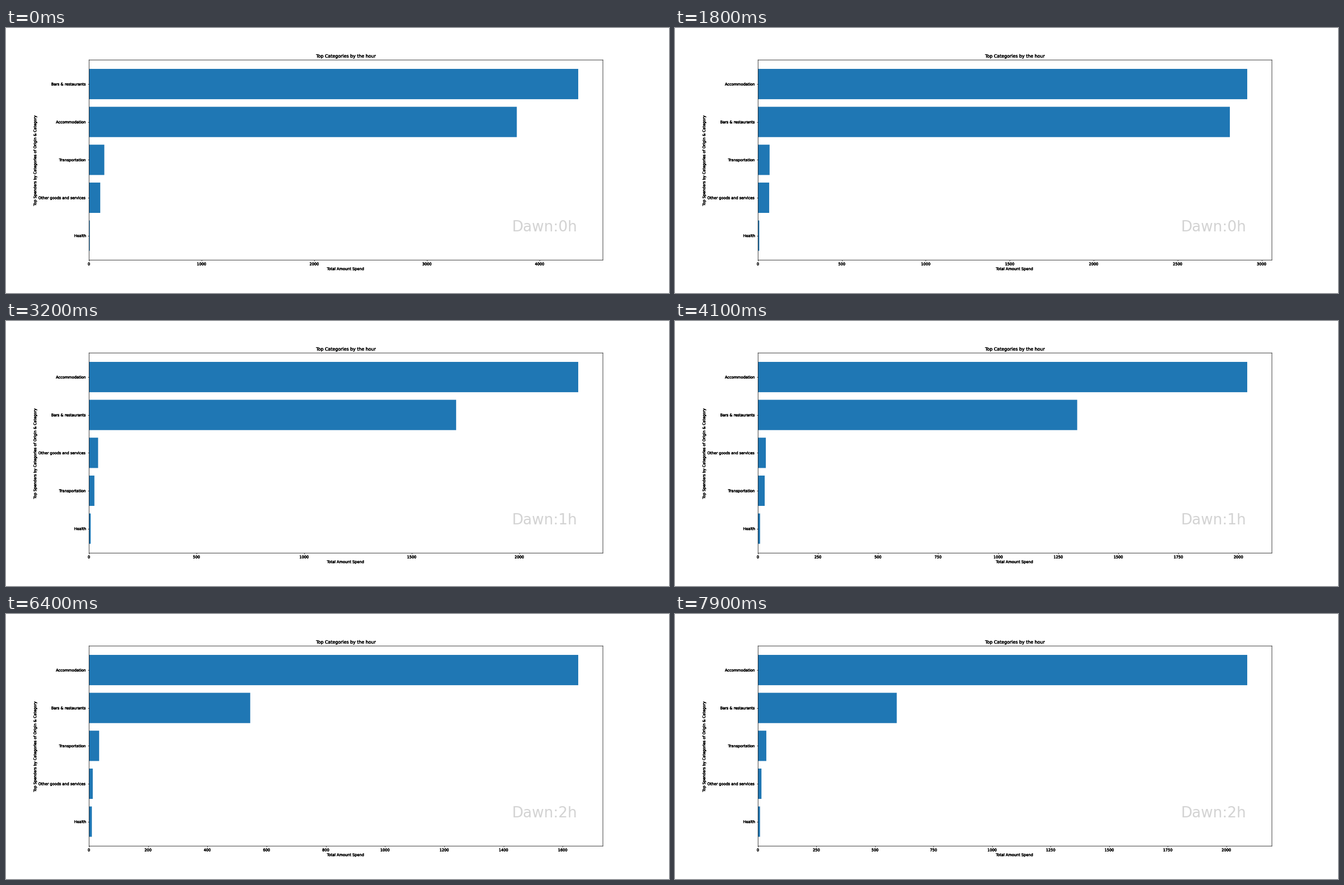
Animation, 1183 px wide and 473 px high, one loop 8000 ms. Source, as a matplotlib script:

```python
import numpy as np
import matplotlib.pyplot as plt
from matplotlib import patheffects
from matplotlib.animation import FuncAnimation
from matplotlib.transforms import ScaledTranslation

WIDTH, HEIGHT = 1183, 473
DPI = WIDTH / 25
FRAMES, INTERVAL = 80, 100
STEPS_PER_HOUR = 30

# Amount spent at the start of each hour
HOURLY = {
    "Health": [8.3, 8.4, 10.4, 8.4],
    "Other goods and services": [101, 45, 12.6, 16.8],
    "Transportation": [137, 25, 34.3, 37],
    "Accommodation": [3797, 2326, 1536, 2409],
    "Bars & restaurants": [4342, 1790, 532, 628],
}
HOUR_STARTS = np.arange(4) * STEPS_PER_HOUR
HEAVY = [patheffects.withStroke(linewidth=0.7, foreground="black")]

plt.rcParams.update({
    "font.family": "DejaVu Sans",
    "axes.linewidth": 1.15,
    "xtick.major.width": 1.15,
    "ytick.major.width": 1.15,
})

fig, ax = plt.subplots(
    figsize=((WIDTH + 0.01) / DPI, (HEIGHT + 0.01) / DPI), dpi=DPI)
fig.subplots_adjust(left=0.125, right=0.9, bottom=0.125, top=0.88)

# Unsnapped edges keep their fractional pixel positions
bars = ax.barh(range(len(HOURLY)), [1] * len(HOURLY), color="#1f77b4",
               snap=False)
ax.set_yticks(range(len(HOURLY)))
nudge = ScaledTranslation(0.5 / 72, -0.5 / 72, fig.dpi_scale_trans)
for spine in ax.spines.values():
    spine.set_transform(spine.get_spine_transform() + nudge)
    spine.set_snap(False)

headings = [
    ax.set_title("Top Categories by the hour"),
    ax.set_xlabel("Total Amount Spend"),
    ax.set_ylabel("Top Spenders by Categories of Origin & Category"),
]
clock = ax.text(0.95, 0.142, "", transform=ax.transAxes, size=40,
                color="lightgray", ha="right", va="baseline")


def embolden(texts):
    for text in texts:
        text.set_path_effects(HEAVY)


def update(step):
    amounts = {name: np.interp(step, HOUR_STARTS, values)
               for name, values in HOURLY.items()}
    ranked = sorted(amounts, key=amounts.get)
    for bar, name in zip(bars, ranked):
        bar.set_width(amounts[name])
    ax.set_xlim(0, amounts[ranked[-1]] * 1.05)
    ax.set_yticklabels(ranked)
    embolden(ax.get_xticklabels() + ax.get_yticklabels())
    clock.set_text(f"Dawn:{step // STEPS_PER_HOUR}h")
    return [*bars, clock]


embolden(headings)
anim = FuncAnimation(fig, update, frames=FRAMES, interval=INTERVAL,
                     repeat=True, repeat_delay=0, blit=False)
plt.show()
```
